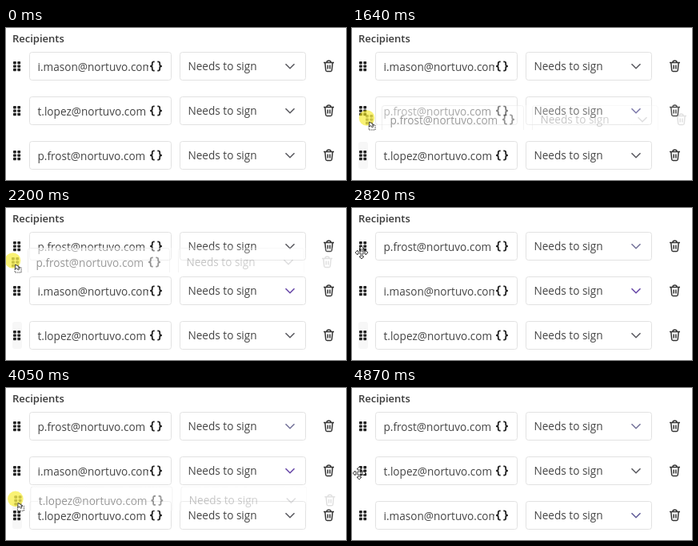
These frames come from a looping animation (425x191 px, 5140 ms). An HTML page:

```html
<!DOCTYPE html>
<html lang="en">
<head>
<meta charset="utf-8">
<title>Reordering recipients</title>
<style>
  html, body { margin: 0; width: 100%; height: 100%; overflow: hidden; background: #fff; }
  svg { display: block; width: 100%; height: 100%; }
  text { font: 13.6px "Open Sans", "Noto Sans", sans-serif; fill: #444; }
  .title { font-size: 13px; font-weight: 600; fill: #3a3a3a; }
  .box { fill: #fff; stroke: #e2e2e2; }
  .grip { fill: #222; }
  .icon { fill: none; stroke: #333; stroke-width: 1.5; }
  .brace { fill: none; stroke: #222; stroke-width: 1.8; }
  .chevron { fill: none; stroke: #5a5a60; stroke-width: 1.6; }
  .glow { fill: #f6ea1e; }
  .pointer { fill: #fff; stroke: #333; stroke-width: .9; }
</style>
</head>
<body>
<svg viewBox="0 0 425 191" preserveAspectRatio="none">
  <defs>
    <clipPath id="field"><rect x="32" y="-15" width="146" height="30"/></clipPath>
    <linearGradient id="fade" gradientUnits="userSpaceOnUse" x1="0" x2="425" y1="0" y2="0">
      <stop offset="0" stop-color="#fff" stop-opacity=".6"/>
      <stop offset=".4" stop-color="#fff" stop-opacity=".52"/>
      <stop offset=".56" stop-color="#fff" stop-opacity=".32"/>
      <stop offset="1" stop-color="#fff" stop-opacity=".13"/>
    </linearGradient>
    <linearGradient id="veil" gradientUnits="userSpaceOnUse" x1="0" x2="425" y1="0" y2="0">
      <stop offset=".1" stop-color="#fff" stop-opacity=".62"/>
      <stop offset=".4" stop-color="#fff" stop-opacity=".45"/>
      <stop offset=".56" stop-color="#fff" stop-opacity=".28"/>
      <stop offset="1" stop-color="#fff" stop-opacity=".12"/>
    </linearGradient>
    <mask id="ghostMask" maskUnits="userSpaceOnUse" x="0" y="-18" width="425" height="31">
      <rect x="0" y="-18" width="425" height="31" fill="url(#fade)"/>
    </mask>
  </defs>
  <rect width="425" height="191" fill="#fff"/>
  <text class="title" x="8" y="18">Recipients</text>
  <rect id="hover" x="8" y="143" width="12" height="34" rx="3" fill="#f7f7f7"/>
  <g id="rows"></g>
  <g id="ghost">
    <rect x="24" y="-18" width="401" height="31" fill="url(#veil)"/>
    <g id="ghostRow" mask="url(#ghostMask)"></g>
  </g>
  <circle id="glow" class="glow" r="9.8"/>
  <path id="move" class="pointer" d="M0-8L3-5H1V-1H5V-3L8 0 5 3V1H1V5H3L0 8-3 5H-1V1H-5V3L-8 0-5-3V-1H-1V-5H-3Z"/>
  <path id="beam" d="M-3-8H-1Q0-8 0-7Q0-8 1-8H3M0-7V7M-3 8H-1Q0 8 0 7Q0 8 1 8H3" fill="none" stroke="#333"/>
  <g id="carry">
    <rect class="pointer" x="-3.5" y="-1" width="8" height="6" stroke-dasharray="1.5 1"/>
    <path class="pointer" d="M-3-5V1L-1-.5 .5 2 2 1.2 .8-1.2H3Z"/>
  </g>
</svg>
<script>
const LOOP = 5140;
const ROW_Y = [48, 104, 160];
const EMAILS = ["i.mason@nortuvo.com", "t.lopez@nortuvo.com", "p.frost@nortuvo.com"];
const GRAY = "#5a5a60", SLATE = "#75739a", INDIGO = "#605c98", PURPLE = "#6848a8";

// Bursts of movement: first change, last change, number of changes
const BURSTS = [
  [190, 670, 7], [740, 740, 1], [880, 950, 2], [1150, 1640, 8], [1710, 2200, 8],
  [2270, 2620, 6], [2820, 2820, 1], [3020, 3440, 7], [3720, 4170, 7], [4250, 4740, 8], [4870, 4870, 1]
];
// Row order and chevron colours from each time on
const STATES = [
  [0, [0, 1, 2], [GRAY, GRAY, GRAY]],
  [1430, [0, 2, 1], [GRAY, INDIGO, GRAY]],
  [1990, [2, 0, 1], [GRAY, PURPLE, GRAY]],
  [2820, [2, 0, 1], [SLATE, PURPLE, GRAY]],
  [4090, [2, 1, 0], [SLATE, SLATE, INDIGO]],
  [4870, [2, 1, 0], [SLATE, GRAY, INDIGO]]
];
// Pointer path and drag offsets as [time, x, y]
const POINTER = [
  [190, 120, 166], [670, 18, 161], [740, 17, 161], [880, 14, 160], [950, 13, 160], [1150, 13, 160],
  [2820, 12, 56], [2950, 12, 56], [3440, 12, 167], [3720, 12, 167], [4870, 9, 107]
];
const DRAGS = [
  { from: 1200, to: 2820, item: 2, path: [[1150, 0, 160], [1640, 8, 115], [2200, -2, 68], [2620, -3, 51]] },
  { from: 3780, to: 4870, item: 1, path: [[3720, 0, 160], [4170, 2, 132], [4320, 1.3, 122], [4740, -1, 108]] }
];

const $ = id => document.getElementById(id);
const show = (el, on) => el.setAttribute("display", on ? "inline" : "none");
const place = (el, x, y) => el.setAttribute("transform", `translate(${x} ${y})`);

function rowMarkup() {
  let dots = "";
  for (const y of [-6, -1.6, 2.8])
    for (const x of [9, 14.3]) dots += `<rect x="${x}" y="${y}" width="3.8" height="3.4" rx=".8"/>`;
  const brace = "M-1.8-5.6H-2.7Q-4.7-5.6-4.7-3.8V-2Q-4.7 0-7.4 0Q-4.7 0-4.7 2V3.8Q-4.7 5.6-2.7 5.6H-1.8";
  return `<g class="grip">${dots}</g>
    <rect class="box field" x="29.5" y="-17.5" width="177" height="35" rx="3"/>
    <g clip-path="url(#field)"><text class="email" x="39.5" y="6"></text></g>
    <g transform="translate(187.5 0)" class="brace"><path d="${brace}"/><path d="${brace}" transform="scale(-1 1)"/></g>
    <rect class="box" x="217.5" y="-17.5" width="157" height="35" rx="3"/>
    <text x="227.5" y="5">Needs to sign</text>
    <path class="chevron" d="M349.5-2.8L355 2.7L360.5-2.8"/>
    <path class="icon" d="M397-4.5H410M401-4.5V-5Q401-7 403.5-7T406-5V-4.5M398.8-4.5L399.7 5Q399.9 6.5 401.3 6.5H405.7Q407.1 6.5 407.3 5L408.2-4.5M402.2-1.5V3.5M404.9-1.5V3.5"/>`;
}

function makeRow(parent) {
  const g = document.createElementNS("http://www.w3.org/2000/svg", "g");
  g.innerHTML = rowMarkup();
  parent.append(g);
  return {
    g,
    email: g.querySelector(".email"),
    field: g.querySelector(".field"),
    chevron: g.querySelector(".chevron")
  };
}

const rows = ROW_Y.map(y => {
  const row = makeRow($("rows"));
  place(row.g, 0, y);
  return row;
});
const ghostRow = makeRow($("ghostRow"));
// The veil alone covers what lies beneath the dragged row
ghostRow.g.querySelectorAll(".box").forEach(box => box.style.fill = "none");

// Time of the latest change
function snap(t) {
  let last = 0;
  for (const [start, end, n] of BURSTS) {
    if (t < start) break;
    const step = n > 1 ? (end - start) / (n - 1) : 1;
    last = Math.min(end, start + Math.floor((t - start) / step + 1e-6) * step);
  }
  return last;
}

function along(path, t) {
  if (t <= path[0][0]) return path[0].slice(1);
  for (let i = 1; i < path.length; i++) {
    const [t0, x0, y0] = path[i - 1], [t1, x1, y1] = path[i];
    if (t <= t1) {
      const k = (t - t0) / (t1 - t0);
      return [x0 + (x1 - x0) * k, y0 + (y1 - y0) * k];
    }
  }
  return path[path.length - 1].slice(1);
}

function render(time) {
  const t = snap(time);
  const [, order, colors] = STATES.filter(s => s[0] <= t).pop();
  const [px, py] = along(POINTER, t);
  const drag = DRAGS.find(d => t >= d.from && t < d.to);
  const overField = t >= 190 && px > 29 && !drag;

  rows.forEach((row, i) => {
    row.email.textContent = EMAILS[order[i]];
    row.chevron.style.stroke = colors[i];
    row.field.style.stroke = i === 2 && overField ? "#a8a8a8" : "";
  });

  show($("hover"), t >= 1200 && t < 4090);
  show($("ghost"), drag);
  show($("carry"), drag);
  show($("beam"), overField);
  show($("move"), t >= 190 && !overField && !drag);
  show($("glow"), drag || (t >= 950 && t < 1200) || (t >= 3720 && t < 3780));
  $("glow").style.opacity = drag ? .62 : .85;
  place($("beam"), px, py);
  place($("move"), px, py);
  place($("glow"), px, py);

  if (drag) {
    const [dx, y] = along(drag.path, t);
    ghostRow.email.textContent = EMAILS[drag.item];
    place($("ghost"), dx, y);
    place($("glow"), 10.5 + dx, y - 2);
    place($("carry"), 16.6 + dx, y + 8);
  }
}

const begin = performance.now();
function tick() {
  render((performance.now() - begin) % LOOP);
  requestAnimationFrame(tick);
}
tick();
</script>
</body>
</html>
```
